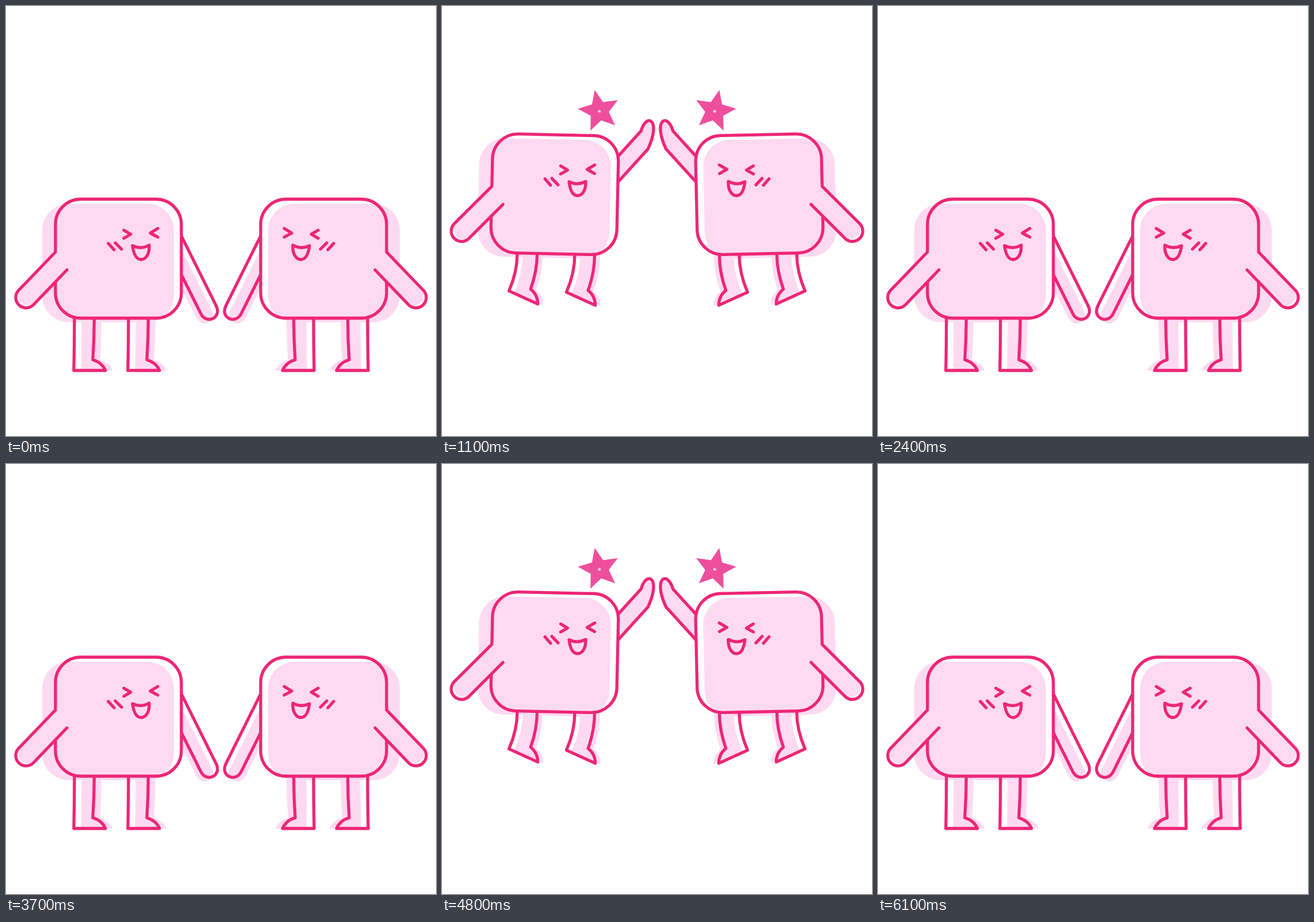
An HTML page for the animation above (7500 ms loop, 748 by 748 pixels).

```html
<!DOCTYPE html>
<html lang="en">
<head>
<meta charset="utf-8">
<title>High five</title>
<style>
html, body { margin: 0; width: 100%; height: 100%; overflow: hidden; background: #fff; }
svg { display: block; width: 100%; height: 100%; }
.line { fill: none; stroke: #ee2676; stroke-width: 5.3; stroke-linecap: round; stroke-linejoin: round; }
.tint { fill: #fddaf1; }
.white { fill: #fff; }
.star { fill: #ee4f9d; }
</style>
</head>
<body>
<svg id="stage" viewBox="0 0 748 748"></svg>
<script>
const stage = document.getElementById('stage');
const LOOP = 7500, SECOND = 3700, STEP = 100;
const FLIP = 'matrix(-1 0 0 1 748 0)';

const REST = { x: 195.5, y: 439.5, tilt: 0, arm: 63.5, shoulder: -25, reach: 127, hand: 0,
  hip: -76.5, gap: 94, heelX: -1, heelY: 91, foot: 0 };
const CLAP = { x: 216.5, y: 436.5, tilt: 11.5, arm: -53, shoulder: -19, reach: 85, hand: 1,
  hip: -58, gap: 106, heelX: -36, heelY: 50, foot: 49 };
const LAND = { x: 175.5, y: 374.5, tilt: -9, arm: -42.5, shoulder: -52, reach: 80, hand: 1,
  hip: -67.5, gap: 94, heelX: 7, heelY: 82, foot: 0 };

function add(parent, tag, attrs = {}) {
  const el = document.createElementNS('http://www.w3.org/2000/svg', tag);
  for (const k in attrs) el.setAttribute(k, attrs[k]);
  return parent.appendChild(el);
}
function rotate([x, y], deg) {
  const r = deg * Math.PI / 180, c = Math.cos(r), s = Math.sin(r);
  return [x * c - y * s, x * s + y * c];
}
const plus = (a, b) => [a[0] + b[0], a[1] + b[1]];
const mid = (a, b) => [(a[0] + b[0]) / 2, (a[1] + b[1]) / 2];
const num = p => p.map(v => v.toFixed(2)).join(' ');
const smooth = u => u * u * (3 - 2 * u);

function mix(a, b, u) {
  const out = {};
  for (const k in a) out[k] = a[k] + (b[k] - a[k]) * u;
  return out;
}

// wind up and leap, fly apart, settle
function poseAt(t) {
  if (t < 600) {
    const u = t / 600, dip = Math.sin(Math.PI * u);
    const p = mix(REST, CLAP, u ** 3);
    p.x -= 9 * dip;
    p.y += 62 * dip;
    p.tilt -= 4 * dip;
    return p;
  }
  if (t < 1600) {
    const u = (t - 600) / 1000;
    const p = mix(CLAP, LAND, smooth(u));
    p.y -= 312 * u * (1 - u);
    return p;
  }
  return mix(LAND, REST, smooth(Math.min(1, (t - 1600) / 400)));
}

function armPath(p) {
  const h = p.hand, skew = 7.5 * h;
  const shoulder = plus([p.x, p.y], rotate([100, p.shoulder], p.tilt));
  const at = (u, v) => num(plus(shoulder, rotate([p.reach + u, v], p.arm)));
  const root = -p.reach - 25;
  return `M${at(root, -15)}L${at(skew, -15)}` +
    `C${at(23 + 15 * h, -15 - 15 * h)} ${at(23 + 24 * h, 15 - 17 * h)} ${at(-skew, 15)}L${at(root, 15)}`;
}

function legPath(p, side) {
  const edge = x => plus([p.x, p.y], rotate([p.hip + side * p.gap + x, 103.5], p.tilt));
  const left = edge(0), right = edge(34.5);
  const heel = plus(left, [p.heelX, p.heelY]);
  const foot = (x, y) => plus(heel, rotate([x, y], p.foot));
  const ankle = foot(33, -18.5);
  const side2 = (top, end) => [top[0], (top[1] + end[1]) / 2];
  const up = q => num(plus(q, [0, -14]));
  return `M${up(left)}L${num(left)}Q${num(side2(left, heel))} ${num(heel)}` +
    `L${num(foot(55, 0))}Q${num(foot(49, -14))} ${num(ankle)}` +
    `Q${num(side2(right, ankle))} ${num(right)}L${up(right)}`;
}

const BODY = { x: -109.5, y: -103.5, width: 219, height: 207, rx: 44 };
const TINT = { x: -132.5, y: -95.5, width: 229, height: 206, rx: 46, class: 'tint' };
const BACK_ARM = 'M86 428L22 494.5A18 18 0 0 0 48 519.5L106 459';
const FACE = 'M205 390L217 397L205 404M264 387L251 395L264 402' +
  'M178 413L188 424M190 412L201 423' +
  'M220 417Q235 424 249 416C250 430 244 441 235 441C227 441 222 431 220 417Z';

add(add(stage, 'clipPath', { id: 'inside' }), 'rect', BODY);

function buddy(flip) {
  const g = add(stage, 'g', flip ? { transform: FLIP } : {});
  const limb = () => ({ fill: add(g, 'path', { class: 'tint' }), line: add(g, 'path', { class: 'line' }) });
  const back = add(g, 'g');
  add(back, 'rect', TINT);
  const arm = limb(), legs = [limb(), limb()];

  const front = add(g, 'g');
  add(front, 'rect', { ...BODY, class: 'white' });
  add(add(front, 'g', { 'clip-path': 'url(#inside)' }), 'rect', TINT);
  add(front, 'rect', { ...BODY, class: 'line' });
  const local = add(front, 'g', { transform: `translate(${-REST.x} ${-REST.y})` });
  add(local, 'path', { d: BACK_ARM, class: 'tint', transform: 'translate(4 -4)' });
  add(local, 'path', { d: BACK_ARM + FACE, class: 'line' });

  function place({ fill, line }, d, shift) {
    line.setAttribute('d', d);
    fill.setAttribute('d', d);
    fill.setAttribute('transform', `translate(${num(shift)})`);
  }
  return p => {
    for (const el of [back, front])
      el.setAttribute('transform', `translate(${num([p.x, p.y])}) rotate(${p.tilt.toFixed(2)})`);
    place(arm, armPath(p), [-8 * (1 - p.hand), 7 * (1 - p.hand)]);
    legs.forEach((leg, i) => place(leg, legPath(p, i), [12.5 - p.foot / 8, p.foot / 16]));
  };
}

function starPath(x, y, r) {
  const pts = Array.from({ length: 10 }, (_, i) =>
    num(plus([x, y], rotate([0, -r * (i % 2 ? 0.45 : 1)], i * 36 - 12))));
  return `M${pts.join('L')}Z`;
}

// sparks thrown from the clap, hollowing out as they slow down
function spark(flip) {
  const g = add(stage, 'g', flip ? { transform: FLIP } : {});
  const shape = add(g, 'path', { class: 'star' });
  const hole = add(g, 'path', { class: 'white' });
  return t => {
    const u = (t - 600) / 1000;
    const seen = u > 0 && u <= 1;
    g.setAttribute('visibility', seen ? 'visible' : 'hidden');
    if (!seen) return;
    const e = 1 - (1 - u) ** 3.3;
    const x = 374 - 112 * e, y = 329 - 163 * e;
    const r = (14 + 26 * e) * (1 - 0.3 * u ** 20);
    shape.setAttribute('d', starPath(x, y, r));
    hole.setAttribute('d', starPath(x + 3 * u ** 3, y + 6 * u ** 3, 0.72 * r * u ** 3));
  };
}

const buddies = [buddy(true), buddy(false)];
const sparks = [spark(true), spark(false)];

function draw(ms) {
  const held = Math.floor((ms % LOOP) / STEP) * STEP;
  const t = held < SECOND ? held : held - SECOND;
  const pose = poseAt(t);
  buddies.forEach(set => set(pose));
  sparks.forEach(set => set(t));
}

const start = performance.now();
function tick() {
  draw(performance.now() - start);
  requestAnimationFrame(tick);
}
tick();
</script>
</body>
</html>
```
